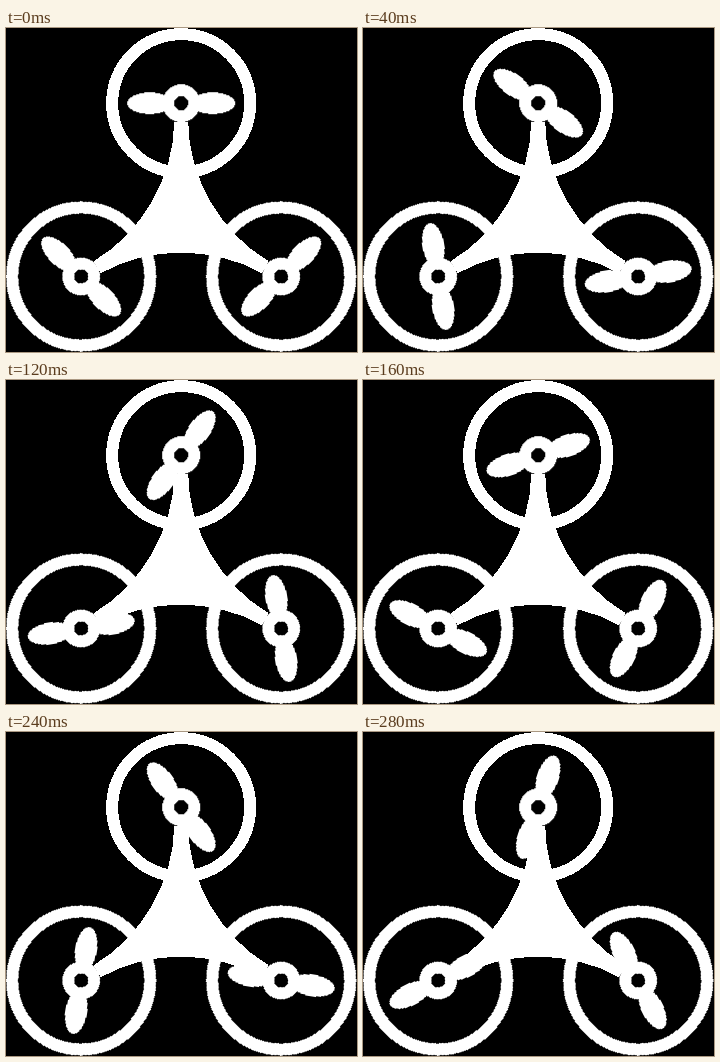
Animation of 351 by 324 pixels, one loop 320 ms. Source, as an HTML page without scripts:

```html
<!DOCTYPE html>
<html lang="en">
<head>
<meta charset="utf-8">
<title>Tricopter</title>
<style>
  html, body {
    margin: 0;
    width: 100%;
    height: 100%;
    overflow: hidden;
    background: #000;
  }
  svg { display: block; width: 100%; height: 100%; }
  .blades { animation: spin 320ms step-end infinite; }

  /* Hard steps, unevenly spaced */
  @keyframes spin {
    0%    { transform: rotate(0deg); }
    12.5% { transform: rotate(36deg); }
    25%   { transform: rotate(72deg); }
    37.5% { transform: rotate(126deg); }
    50%   { transform: rotate(162deg); }
    62.5% { transform: rotate(198deg); }
    75%   { transform: rotate(234deg); }
    87.5% { transform: rotate(288deg); }
    100%  { transform: rotate(360deg); }
  }
</style>
</head>
<body>
<svg viewBox="0 0 351 324" fill="#fff" shape-rendering="crispEdges">
  <defs>
    <g id="ring">
      <circle r="69" fill="none" stroke="#fff" stroke-width="12"/>
    </g>
    <g id="hub">
      <circle r="19"/>
      <circle r="7" fill="#000"/>
    </g>
  </defs>

  <rect width="351" height="324" fill="#000"/>

  <!-- Body with three concave sides -->
  <path transform="translate(175.2 190.7)" d="M-80.5 54.6C-32.9 27.1 32.9 27.1 80.5 54.6L87.5 42.4C39.9 15 7 -42 7 -97H-7C-7 -42 -39.9 15 -87.5 42.4Z"/>

  <!-- Rotors -->
  <g transform="translate(175.2 75.2)">
    <use href="#ring"/>
    <g class="blades">
      <ellipse cx="-31.5" rx="22.5" ry="10.8"/>
      <ellipse cx="31.5" rx="22.5" ry="10.8"/>
    </g>
    <use href="#hub"/>
  </g>
  <g transform="translate(75.2 248.5) rotate(45)">
    <use href="#ring"/>
    <g class="blades">
      <ellipse cx="-31.5" rx="22.5" ry="10.8"/>
      <ellipse cx="31.5" rx="22.5" ry="10.8"/>
    </g>
    <use href="#hub"/>
  </g>
  <g transform="translate(275.2 248.5) rotate(-45)">
    <use href="#ring"/>
    <g class="blades">
      <ellipse cx="-31.5" rx="22.5" ry="10.8"/>
      <ellipse cx="31.5" rx="22.5" ry="10.8"/>
    </g>
    <use href="#hub"/>
  </g>
</svg>
</body>
</html>
```
